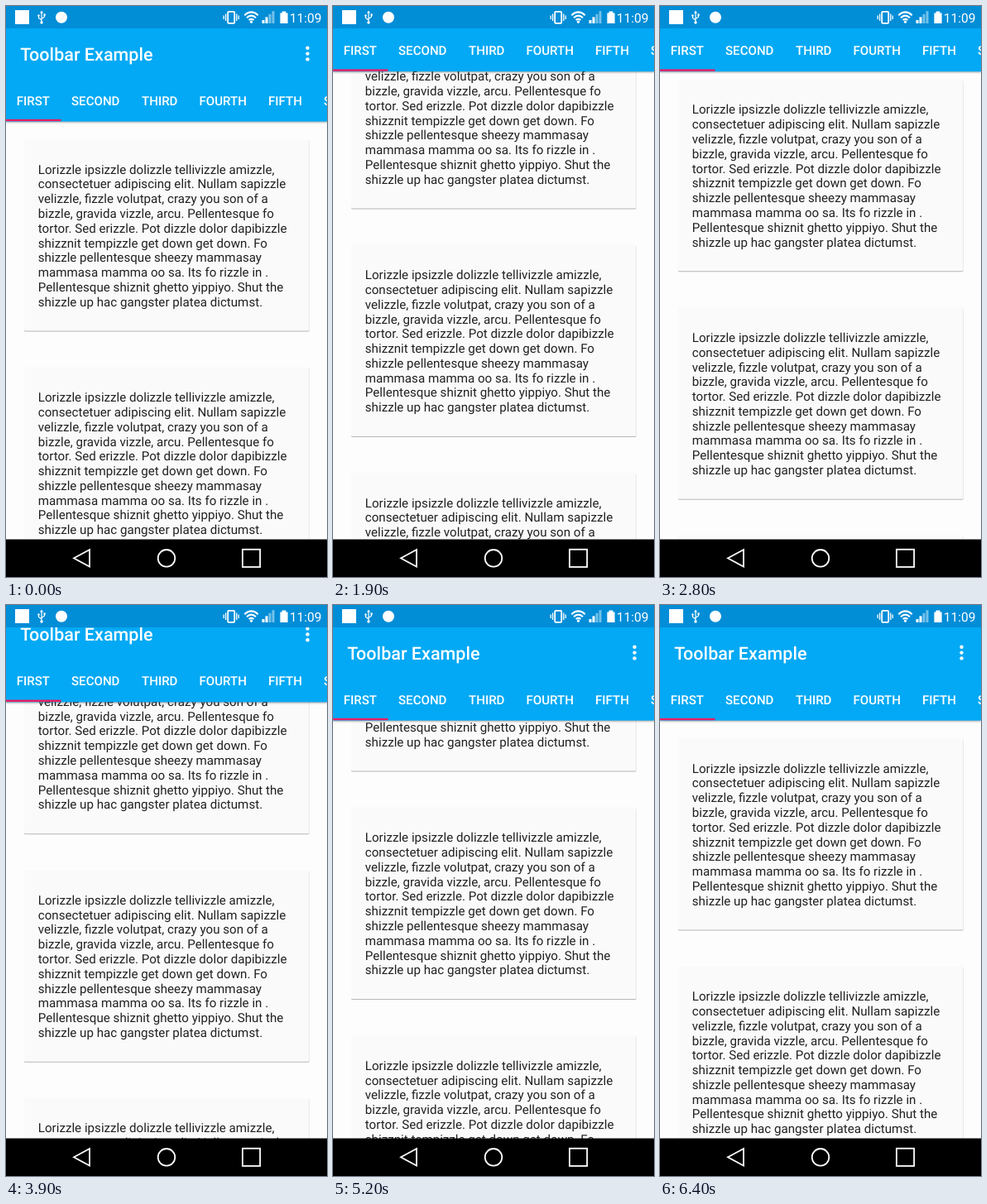
Animation, 388 px wide and 690 px high, one loop 6.5 s. Source, as an HTML page:

```html
<!DOCTYPE html>
<html lang="en">
<head>
<meta charset="utf-8">
<title>Toolbar Example</title>
<style>
  html, body { margin: 0; width: 100%; height: 100%; overflow: hidden; background: #fdfdfd; }
  svg { display: block; width: 388px; height: 690px; font-family: Roboto, sans-serif; text-rendering: geometricPrecision; }
  .card rect { fill: #fafafa; filter: drop-shadow(0 1px .6px rgba(0, 0, 0, .28)); }
  .card text { font-size: 15.15px; fill: #212121; }
  .bar { fill: #03a9f4; filter: drop-shadow(0 1px 1.2px rgba(0, 0, 0, .35)); }
  .title { font-size: 21.55px; font-weight: 500; }
  .tabs { font-size: 15.09px; font-weight: 500; }
  .line { fill: none; stroke: #fff; stroke-width: 1.8; }
</style>
</head>
<body>
<svg viewBox="0 0 388 690">
  <rect width="388" height="690" fill="#fdfdfd"/>
  <g id="list"></g>

  <g id="header" fill="#fff">
    <rect class="bar" y="-10" width="388" height="149.6"/>
    <text class="title" x="17.2" y="65.6">Toolbar Example</text>
    <circle cx="364.5" cy="50.8" r="2.2"/>
    <circle cx="364.5" cy="57.6" r="2.2"/>
    <circle cx="364.5" cy="64.4" r="2.2"/>
    <g id="tabs" class="tabs"></g>
    <rect y="136.8" width="66.5" height="2.4" fill="#e91e63"/>
  </g>

  <g id="status" fill="#fff">
    <rect width="388" height="27" fill="#028dd7"/>
    <rect x="11" y="5" width="17" height="17"/>
    <path class="line" style="stroke-width:1.2" d="M43 8V20M43 17L39.5 14.5V11.5M43 15.5L46.5 13V10.5"/>
    <path d="M43 5.5l2 3h-4z"/>
    <circle cx="43" cy="20" r="1.7"/>
    <circle cx="39.5" cy="11.5" r="1.2"/>
    <rect x="45.4" y="9.4" width="2.3" height="2.3"/>
    <circle cx="67" cy="13.7" r="7"/>

    <rect class="line" x="268.2" y="6.8" width="8" height="14" rx="1"/>
    <path class="line" style="stroke-width:1.3" d="M265.6 9.5V18M263.2 11.5V16M278.8 9.5V18M281.2 11.5V16"/>
    <path class="line" style="stroke-width:2.2" d="M288.3 11.2Q296.5 3.6 304.7 11.2M291 14.2Q296.5 9.2 302 14.2M293.6 17Q296.5 14.6 299.4 17"/>
    <circle cx="296.5" cy="19.2" r="1.6"/>
    <g id="signal"></g>
    <path d="M333.6 6.5h4.8v2h2.2v12.5h-9.2V8.5h2.2z"/>
    <text x="342.8" y="19.5" font-size="15.5">11:09</text>
  </g>

  <g>
    <rect y="644.5" width="388" height="46"/>
    <path class="line" d="M82 667.3L101 657V677.6Z"/>
    <circle class="line" cx="194" cy="667.3" r="10.3"/>
    <rect class="line" x="285.9" y="656.7" width="21.2" height="21.2"/>
  </g>
</svg>
<script>
  const LOOP = 6500, STEP = 100, HIDE = 60.4, PEAK_TIME = 3500, PEAK = 430;
  const CARD_PITCH = 275.5, LINE_PITCH = 17.78;
  const scrollKeys = [
    [0, 0], [300, 0], [1100, 31.3], [1900, 148], [2800, 347.7],
    [PEAK_TIME, PEAK], [4600, 325], [5700, 81], [6200, 0], [LOOP, 0]
  ];
  const lines = [
    'Lorizzle ipsizzle dolizzle tellivizzle amizzle,',
    'consectetuer adipiscing elit. Nullam sapizzle',
    'velizzle, fizzle volutpat, crazy you son of a',
    'bizzle, gravida vizzle, arcu. Pellentesque fo',
    'tortor. Sed erizzle. Pot dizzle dolor dapibizzle',
    'shizznit tempizzle get down get down. Fo',
    'shizzle pellentesque sheezy mammasay',
    'mammasa mamma oo sa. Its fo rizzle in .',
    'Pellentesque shiznit ghetto yippiyo. Shut the',
    'shizzle up hac gangster platea dictumst.'
  ];
  const tabs = [['FIRST', 12.8], ['SECOND', 79], ['THIRD', 164], ['FOURTH', 233.5], ['FIFTH', 317], ['SIXTH', 384]];

  const byId = id => document.getElementById(id);
  const list = byId('list'), header = byId('header');

  const paragraph = lines.map((s, i) => `<text x="38.8" y="${202.7 + i * LINE_PITCH}">${s}</text>`).join('');
  list.innerHTML = Array.from({ length: 5 }, (_, i) =>
    `<g class="card" transform="translate(0 ${i * CARD_PITCH})">
      <rect x="22" y="161" width="344.5" height="231.5" rx="1.5"/>${paragraph}</g>`).join('');
  byId('tabs').innerHTML = tabs.map(([s, x]) => `<text x="${x}" y="119.5">${s}</text>`).join('');
  byId('signal').innerHTML = [0, 1, 2, 3].map(i => {
    const h = 4 + i * 3.6;
    return `<rect x="${309.5 + i * 4}" y="${21 - h}" width="3" height="${h}" opacity="${i < 2 ? 1 : .45}"/>`;
  }).join('');

  function scrollAt(t) {
    const i = scrollKeys.findIndex(key => key[0] > t);
    const [t0, y0] = scrollKeys[i - 1], [t1, y1] = scrollKeys[i];
    return y0 + (y1 - y0) * (t - t0) / (t1 - t0);
  }

  // The bar leaves with upward scrolling and returns as soon as it reverses.
  function hiddenAt(t, y) {
    return t <= PEAK_TIME ? Math.min(y, HIDE) : Math.max(0, HIDE - (PEAK - y));
  }

  function draw() {
    const t = Math.floor(performance.now() % LOOP / STEP) * STEP;
    const y = scrollAt(t);
    list.setAttribute('transform', `translate(0 ${-y})`);
    header.setAttribute('transform', `translate(0 ${-hiddenAt(t, y)})`);
    requestAnimationFrame(draw);
  }
  draw();
</script>
</body>
</html>
```
